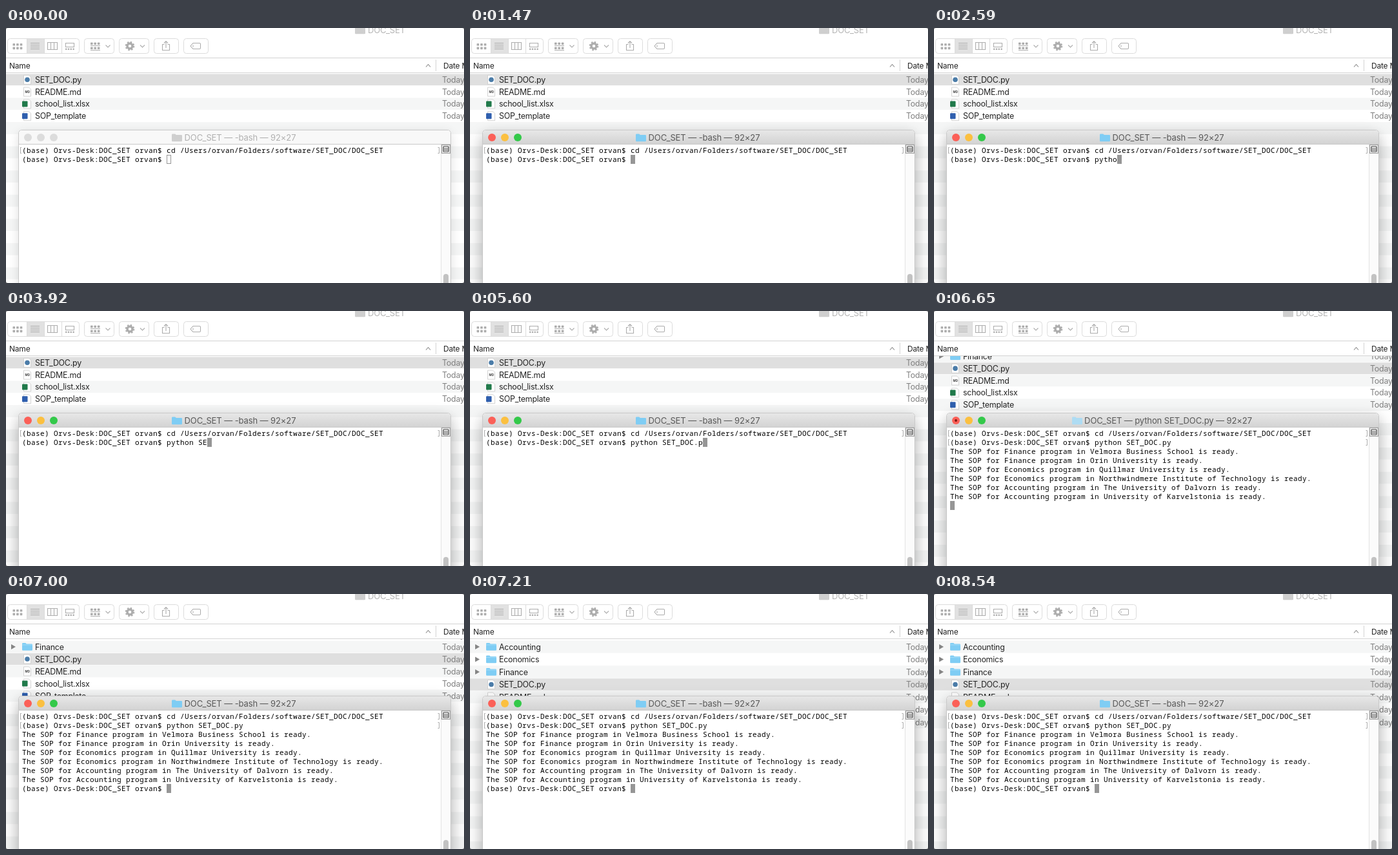
Write an HTML page that moves like this. It is 710x396 px and loops after 8.61 s.

```html
<!DOCTYPE html>
<html lang="en">
<head>
<meta charset="utf-8">
<title>Batch document run</title>
<style>
  html, body { margin: 0; width: 100%; height: 100%; overflow: hidden; background: #fff; }
  svg { display: block; width: 710px; height: 396px; }
  text { white-space: pre; }
  .ui { font: 12.4px Inter, "Open Sans", sans-serif; letter-spacing: -.22px; fill: #242424; }
  .soft { fill: #808080; }
  .title { font-size: 13px; letter-spacing: -.1px; }
  .head { font-size: 12px; }
  .mono { font: 500 11px "Noto Sans Mono", "DejaVu Sans Mono", monospace; letter-spacing: .4px; fill: #000; }
  .btn { fill: #fff; stroke: #dcdcdc; }
  .line { fill: none; stroke: #adadad; stroke-width: 1.1; }
  .solid { fill: #adadad; }
  .bracket { fill: none; stroke: #ababab; }
</style>
</head>
<body>
<svg id="stage" viewBox="0 0 710 396">
  <defs>
    <clipPath id="listClip"><rect y="70" width="710" height="326"/></clipPath>
    <linearGradient id="bar" x2="0" y2="1">
      <stop stop-color="#e7e7e7"/><stop offset="1" stop-color="#d2d2d2"/>
    </linearGradient>
    <filter id="wide" x="-20%" y="-30%" width="140%" height="160%"><feGaussianBlur stdDeviation="14"/></filter>
    <filter id="near" x="-20%" y="-30%" width="140%" height="160%"><feGaussianBlur stdDeviation="8"/></filter>
    <path id="folder" d="M0 1.8Q0 .5 1.3 .5H5.2L6.8 2H14.7Q16 2 16 3.3V11Q16 12.3 14.7 12.3H1.3Q0 12.3 0 11Z"/>
  </defs>

  <rect width="710" height="396" fill="#fff"/>
  <g id="list" clip-path="url(#listClip)"></g>

  <g id="toolbar">
    <rect width="710" height="46" fill="#fff"/>
    <path d="M0 46.5H710" stroke="#d2d2d2"/>
    <use href="#folder" x="541" y="-3" fill="#cfcfcf"/>
    <text class="ui title" x="561" y="8" style="fill:#b4b4b4">DOC_SET</text>
  </g>

  <g id="header">
    <rect y="47" width="710" height="23" fill="#fff"/>
    <path d="M0 69.5H710" stroke="#d4d4d4"/>
    <path d="M666.5 49V67" stroke="#d4d4d4"/>
    <path d="M651 60.5L654.5 56.5L658 60.5" class="line" style="stroke:#8a8a8a"/>
    <text class="ui head" x="5" y="62.5" font-weight="500">Name</text>
    <text class="ui head" x="678" y="62.5">Date Modified</text>
  </g>

  <g id="terminal">
    <rect id="idleShadow" x="19" y="162" width="671" height="260" rx="6" filter="url(#near)"/>
    <rect id="liveShadow" x="19" y="170" width="671" height="270" rx="6" filter="url(#wide)"/>
    <path d="M19.5 400V164Q19.5 158.5 25 158.5H684Q689.5 158.5 689.5 164V400Z" fill="#fff" stroke="#c9c9c9"/>
    <path id="titleBar" d="M20 181V164Q20 159 25 159H684Q689 159 689 164V181Z"/>
    <path d="M20 180.5H689" stroke="#c9c9c9"/>
    <g id="lights"></g>
    <circle id="busyDot" cx="34" cy="170" r="1.9" fill="#7b1410"/>
    <use id="titleIcon" href="#folder" y="164"/>
    <text id="title" class="ui title" x="363" y="175" text-anchor="middle"></text>
    <rect x="674" y="181" width="15" height="215" fill="#fbfbfb"/>
    <path d="M674.5 181V396" stroke="#e2e2e2"/>
    <rect x="675.5" y="181.500" width="13" height="13" fill="#ececec" stroke="#9c9c9c"/>
    <rect x="678" y="184" width="8" height="8" rx="1" fill="#fff" stroke="#3c3c3c" stroke-width="1.2"/>
    <path d="M679 187H685M679 189.500H685" stroke="#3c3c3c"/>
    <rect x="678" y="382" width="8" height="24" rx="4" fill="#c2c2c2"/>
    <g id="lines"></g>
    <rect id="cursor" width="6" height="13" stroke="#969696"/>
  </g>

  <path d="M0 0H3Q0 0 0 3ZM710 0H707Q710 0 710 3ZM0 396H3Q0 396 0 393ZM710 396H707Q710 396 710 393Z" fill="#777"/>
</svg>

<script>
const LOOP = 8610, STEP = 70;
const CELL = 7, LINE = 14, LEFT = 25, TOP = 183;
const PROMPT = '(base) Orvs-Desk:DOC_SET orvan$ ';
const COMMAND = 'python SET_DOC.py';

const KEY_TIMES = [1960, 2100, 2310, 2450, 2590, 2730, 2870, 3640, 3850,
                   4060, 4550, 4760, 4970, 5180, 5320, 5530, 5810];
const FOCUS = 420, ENTER = 6090, BUSY = 6160, DONE = 6790;
const OUTPUT_TIMES = [6440, 6440, 6510, 6510, 6580, 6580];
const OUTPUT = [
  ['Finance', 'Velmora Business School'],
  ['Finance', 'Orin University'],
  ['Economics', 'Quillmar University'],
  ['Economics', 'Northwindmere Institute of Technology'],
  ['Accounting', 'The University of Dalvorn'],
  ['Accounting', 'University of Karvelstonia'],
].map(([field, school]) => `The SOP for ${field} program in ${school} is ready.`);

// Index of the first list row in view, by time; it falls as folders arrive.
const HEAD = [[6510, 3], [6580, 2.85], [6650, 2.57], [6720, 2.25], [6790, 2.08],
              [6860, 2], [7000, 2], [7070, 1.4], [7140, .5], [7210, 0]];
const ROW_TOP = [[0, 82], [2, 82], [3, 80.3]];
const ROW_STEP = [[0, 19.5], [2, 19], [3, 18.8]];
const FILES = [
  ['Accounting', 'folder'], ['Economics', 'folder'], ['Finance', 'folder'],
  ['SET_DOC.py', 'script'], ['README.md', 'note'],
  ['school_list.xlsx', 'sheet'], ['SOP_template', 'letter'],
];
const SELECTED = 3, ROWS = 24;

const $ = id => document.getElementById(id);

function add(parent, tag, attrs = {}, text = '') {
  const node = document.createElementNS('http://www.w3.org/2000/svg', tag);
  set(node, attrs);
  node.textContent = text;
  return parent.appendChild(node);
}

function set(node, attrs) {
  for (const key in attrs) node.setAttribute(key, attrs[key]);
}

function setText(node, text) {
  if (node.textContent !== text) node.textContent = text;
}

function show(node, on) {
  node.style.display = on ? '' : 'none';
}

function lerpTable(table, x) {
  if (x <= table[0][0]) return table[0][1];
  for (let i = 1; i < table.length; i++) {
    const [x0, y0] = table[i - 1], [x1, y1] = table[i];
    if (x <= x1) return y0 + (y1 - y0) * (x - x0) / (x1 - x0);
  }
  return table[table.length - 1][1];
}

function buildToolbar() {
  const bar = $('toolbar');
  const button = (x, w) => add(bar, 'rect', { class: 'btn', x, y: 16.5, width: w, height: 23, rx: 4 });
  const line = d => add(bar, 'path', { class: 'line', d });
  const dot = (x, y, w, h) => add(bar, 'rect', { class: 'solid', x, y, width: w, height: h, rx: .7 });
  const grid = (x, y, cols, rows, size, gap) => {
    for (let i = 0; i < cols * rows; i++)
      dot(x + i % cols * gap, y + Math.floor(i / cols) * gap, size, size);
  };
  const chevron = x => line(`M${x - 3.5} 26.500L${x} 30L${x + 3.5} 26.500`);

  button(2.5, 111);
  add(bar, 'rect', { x: 32, y: 17, width: 27, height: 22, fill: '#e1e1e1' });
  add(bar, 'path', { d: 'M32.500 17V39M59.500 17V39M86.500 17V39', stroke: '#dcdcdc' });
  grid(10.5, 24, 3, 2, 3.6, 5.6);
  line('M38 23.500H52M38 26.500H52M38 29.500H52M38 32.500H52');
  line('M64.500 22.500H79.500V33.500H64.500ZM69.500 22.500V33.500M74.500 22.500V33.500');
  line('M92.500 23.500H105.500V29.500H92.500Z');
  grid(92, 31.5, 4, 1, 2.4, 3.8);

  button(121.5, 46);
  grid(131, 22.5, 3, 1, 3.6, 5.4);
  grid(131, 29.5, 3, 1, 3.6, 5.4);
  line('M131 27.500H146M131 34.500H146');
  chevron(158);

  button(175.5, 46);
  add(bar, 'circle', { cx: 192, cy: 28, r: 4, fill: 'none', stroke: '#adadad', 'stroke-width': 3.4 });
  add(bar, 'circle', { cx: 192, cy: 28, r: 6, fill: 'none', stroke: '#adadad',
    'stroke-width': 2.6, 'stroke-dasharray': 2.356 });
  chevron(211.5);

  button(229.5, 38);
  line('M245.500 25.500H242.500V34.500H253.500V25.500H250.500M248 31V20.500M245 23.500L248 20.500L251 23.500');
  button(275.5, 38);
  line('M286 28L290 23.500H300Q301.500 23.500 301.500 25V31Q301.500 32.500 300 32.500H290Z');
  add(bar, 'circle', { class: 'solid', cx: 290, cy: 28, r: .9 });
}

function drawIcon(row, kind) {
  if (kind === 'folder') {
    add(row, 'path', { d: 'M8 -4L15 0L8 4Z', fill: '#858585' });
    add(row, 'use', { href: '#folder', x: 25, y: -6.5, fill: '#7fcdf4' });
    add(row, 'path', { d: 'M25 -3H41', stroke: '#a3dcf8' });
    return;
  }
  add(row, 'path', { d: 'M27.500 -7H35.500L38.500 -4V7H27.500Z', fill: '#fff', stroke: '#c8c8c8', 'stroke-width': .8 });
  if (kind === 'script') add(row, 'circle', { cx: 33, r: 3.8, fill: '#4b7ca8' });
  if (kind === 'note')
    add(row, 'text', { class: 'ui', x: 29.5, y: 1.5, style: 'font-size:4.5px;font-weight:600;letter-spacing:0' }, 'MD');
  if (kind === 'sheet' || kind === 'letter')
    add(row, 'rect', { x: 25, y: -4.5, width: 8.5, height: 9, rx: 1, fill: kind === 'sheet' ? '#217a4b' : '#2f5fae' });
}

function buildRows() {
  return Array.from({ length: ROWS }, (_, i) => {
    const group = add($('list'), 'g');
    const back = add(group, 'rect', { width: 710 });
    if (FILES[i]) {
      const [name, kind] = FILES[i];
      drawIcon(group, kind);
      add(group, 'text', { class: 'ui', x: 45, y: 4.5 }, name);
      add(group, 'text', { class: 'ui soft', x: 676, y: 4.5 }, 'Today');
    }
    return { group, back };
  });
}

function buildLines() {
  return Array.from({ length: 9 }, (_, i) =>
    add($('lines'), 'text', { class: 'mono', x: LEFT, y: TOP + 11 + i * LINE }));
}

function bracketPair(row) {
  const y = TOP + row * LINE + 2.5;
  return add($('lines'), 'path', { class: 'bracket',
    d: `M24 ${y}H22.500V${y + 9}H24M669.500 ${y}H671.500V${y + 9}H669.500` });
}

buildToolbar();
const rows = buildRows();
const lines = buildLines();
bracketPair(0);
const enterBrackets = bracketPair(1);
const lights = [34, 54, 74].map(cx => add($('lights'), 'circle', { cx, cy: 170, r: 6 }));
const LIGHT_FILL = ['#fb6058', '#fbc040', '#34c94a'];
setText(lines[0], PROMPT + 'cd /Users/orvan/Folders/software/SET_DOC/DOC_SET');

function drawList(t) {
  const head = lerpTable(HEAD, t);
  const top = lerpTable(ROW_TOP, head), step = lerpTable(ROW_STEP, head);
  const first = Math.floor(head);
  rows.forEach(({ group, back }, i) => {
    const y = top + (i - head) * step;
    const picked = i === SELECTED;
    const height = picked ? step - 1 : step;
    const fill = picked ? '#dfdfdf' : (i - first) % 2 ? '#fff' : '#f5f6f6';
    set(group, { transform: `translate(0 ${y.toFixed(2)})` });
    set(back, { y: -height / 2, height, fill });
  });
}

function drawWindow(t) {
  const live = t >= FOCUS, busy = t >= BUSY && t < DONE;
  const rise = Math.min(1, Math.max(0, (t - FOCUS + STEP) / 350));
  set($('liveShadow'), { opacity: .28 * rise });
  set($('idleShadow'), { opacity: .12 - .06 * rise });
  set($('titleBar'), { fill: live ? 'url(#bar)' : '#f8f8f8' });
  lights.forEach((light, i) => set(light, { fill: live ? LIGHT_FILL[i] : '#dcdcdc' }));
  show($('busyDot'), busy);
  setText($('title'), `DOC_SET — ${busy ? COMMAND : '-bash'} — 92×27`);
  $('title').style.fill = live ? '#585858' : '#b0b0b0';
  set($('titleIcon'), {
    x: busy ? 214 : 257,
    fill: !live ? '#cfcfcf' : busy ? '#aedcf3' : '#7fcdf4' });
}

function drawShell(t) {
  const typed = KEY_TIMES.filter(at => at <= t).length;
  const printed = OUTPUT_TIMES.filter(at => at <= t).length;
  let row = 1, col = PROMPT.length + typed;
  if (t >= ENTER) {
    row = 2 + printed;
    col = t >= DONE ? PROMPT.length : 0;
  }
  setText(lines[1], PROMPT + COMMAND.slice(0, typed));
  OUTPUT.forEach((text, i) => setText(lines[i + 2], i < printed ? text : ''));
  setText(lines[8], t >= DONE ? PROMPT : '');
  show(enterBrackets, t >= ENTER);
  set($('cursor'), {
    x: LEFT + col * CELL + .5, y: TOP + row * LINE + .5,
    fill: t >= FOCUS ? '#969696' : 'none' });
}

const start = performance.now();

function frame() {
  const time = Math.max(0, performance.now() - start) % LOOP;
  const t = Math.floor(time / STEP) * STEP;
  drawList(t);
  drawWindow(t);
  drawShell(t);
  requestAnimationFrame(frame);
}
frame();
</script>
</body>
</html>
```
